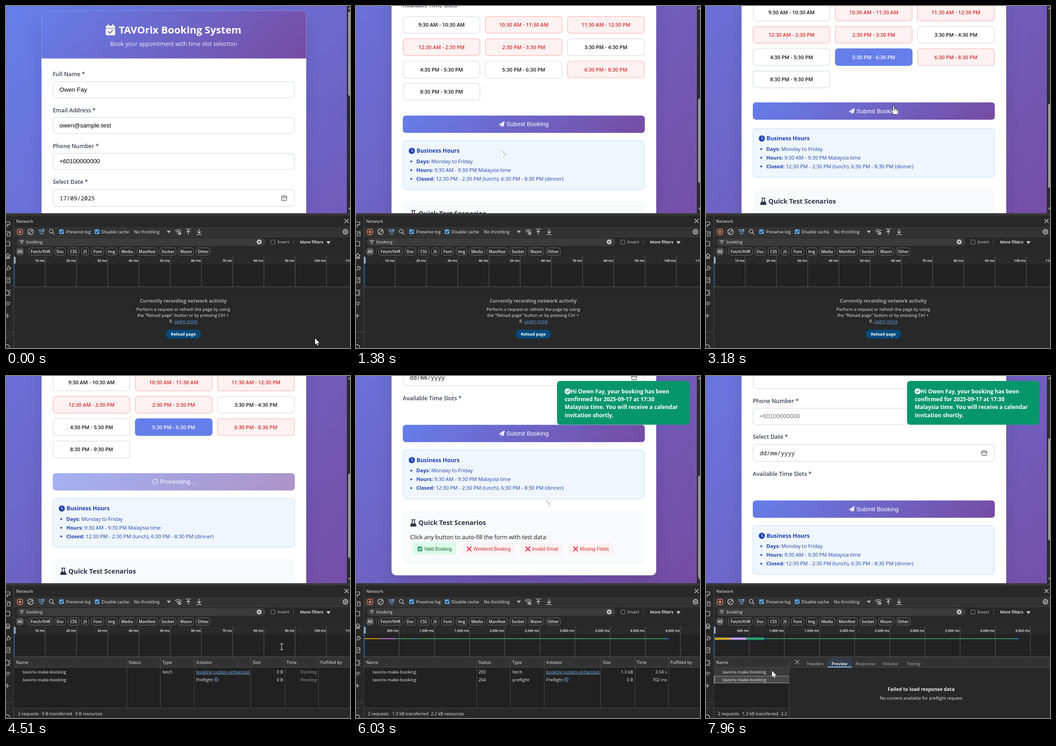
These frames come from a looping animation (750 px wide and 746 px high, 8 s). An HTML page:

```html
<!DOCTYPE html>
<html lang="en">
<head>
<meta charset="utf-8">
<title>Booking form</title>
<style>
html, body { margin: 0; width: 100%; height: 100%; overflow: hidden; background: #282828; }
svg { display: block; font-family: "Open Sans", "Noto Sans", sans-serif; }
.arial { font-family: "Liberation Sans", Arial, sans-serif; }
.mono { font-family: "Noto Sans Mono", monospace; }
.line { fill: none; stroke-linecap: round; stroke-linejoin: round; }
</style>
</head>
<body>
<svg id="stage" width="750" height="746" viewBox="0 0 750 746"></svg>
<script>
const LOOP = 8000, SLOTS_H = 183, VIEW_H = 452, PAGE_H = 868;
const PHONE = '+60100000000', ENDPOINT = 'tavorix-make-booking';

// ---- drawing helpers ----
const text = (x, y, s, size, fill, o = {}) =>
  `<text x="${x}" y="${y}" dy=".36em" font-size="${size}" fill="${fill}" font-weight="${o.w || 400}"` +
  ` text-anchor="${o.a || 'start'}" class="${o.c || ''}"${o.u ? ' text-decoration="underline"' : ''}>${s}</text>`;
const rect = (x, y, w, h, fill, r = 0, stroke = 'none', sw = 1) =>
  `<rect x="${x}" y="${y}" width="${w}" height="${h}" rx="${r}" fill="${fill}" stroke="${stroke}" stroke-width="${sw}"/>`;
const box = (x, y, w, h, fill, r, stroke, sw) =>
  rect(x + sw / 2, y + sw / 2, w - sw, h - sw, fill, r, stroke, sw);
const line = (d, stroke, sw = 1) => `<path class="line" d="${d}" stroke="${stroke}" stroke-width="${sw}"/>`;
const fill = (d, c) => `<path d="${d}" fill="${c}"/>`;
const dot = (x, y, r, c, stroke = 'none', sw = 1) =>
  `<circle cx="${x}" cy="${y}" r="${r}" fill="${c}" stroke="${stroke}" stroke-width="${sw}"/>`;
const group = (id, s, hidden) => `<g id="${id}"${hidden ? ' display="none"' : ''}>${s}</g>`;
const grad = (id, x, y, w, h) => {
  const cx = x + w / 2, cy = y + h / 2, k = (w + h) / 4;
  return `<linearGradient id="${id}" gradientUnits="userSpaceOnUse" x1="${cx - k}" y1="${cy - k}" x2="${cx + k}" y2="${cy + k}">` +
    '<stop stop-color="#667eea"/><stop offset="1" stop-color="#764ba2"/></linearGradient>';
};

// ---- web page ----
const label = (y, s) => text(102, y, s, 12.3, '#374151', { w: 600 });
const field = (y, h = 37) => box(102, y, 527.5, h, '#fff', 6.5, '#e1e5e9', 1.7);
const value = (y, s, c = '#000') => text(116.5, y, s, 13.2, c, { c: 'arial' });
const date = s => text(117, 419, s, 12.8, '#111', { c: 'mono' });

const header =
  rect(77.5, 10.8, 577, 115, 'url(#headFill)', 10) + rect(77.5, 114.5, 577, 20, '#fff') +
  rect(217.5, 43, 20.5, 21, '#fff', 2.5) + rect(221.5, 40, 2.8, 6, '#fff', 1) + rect(231.5, 40, 2.8, 6, '#fff', 1) +
  line('M217 48.6H239', '#6c68c8', 1.4) + line('M223.5 56L226.7 59.2L232.5 53', '#6c68c8', 2.2) +
  text(513, 52.5, 'TAVOrix Booking System', 22, '#fff', { w: 700, a: 'end' }) +
  text(365.5, 82.5, 'Book your appointment with time slot selection', 12.55, '#f2effb', { a: 'middle' });

const calendar = rect(601, 414, 11, 10.5, 'none', 2, '#333', 1) + line('M601 417H612', '#333', 1) +
  [0, 1, 2].map(i => dot(604 + i * 2.6, 419.6, .6, '#333') + dot(604 + i * 2.6, 422, .6, '#333')).join('');

const form =
  label(149, 'Full Name *') + field(164) + label(227.3, 'Email Address *') + field(242.2) +
  label(305.6, 'Phone Number *') + field(320.6) + label(384, 'Select Date *') + field(399, 39) + calendar +
  label(465, 'Available Time Slots *') +
  group('filled', value(182, 'Owen Fay') + value(260.3, 'owen@sample.test') + value(338.5, PHONE) + date('17/09/2025')) +
  group('blank', value(338.5, PHONE, '#757575') + date('dd/mm/yyyy'), true);

const slotNames = ['9:30 AM - 10:30 AM', '10:30 AM - 11:30 AM', '11:30 AM - 12:30 PM', '12:30 AM - 2:30 PM',
  '2:30 PM - 3:30 PM', '3:30 PM - 4:30 PM', '4:30 PM - 5:30 PM', '5:30 PM - 6:30 PM', '6:30 PM - 8:30 PM', '8:30 PM - 9:30 PM'];
const booked = [1, 2, 3, 4, 8], picked = 7;
const slot = (i, bg, edge, ink) => {
  const x = 102 + i % 3 * 179.2, y = 488.5 + Math.floor(i / 3) * 48.7;
  return box(x, y, 169, 38.2, bg, 6.5, edge, 1.7) +
    text(x + 84.5, y + 19.3, slotNames[i], 11.15, ink, { w: 600, a: 'middle' });
};
const slots = slotNames.map((_, i) => booked.includes(i)
  ? slot(i, '#fef1f1', '#fcc8c8', '#d32a2a') : slot(i, '#fff', '#e1e5e9', '#111')).join('') +
  group('slotHover', slot(picked, '#f3f5fe', '#667eea', '#111'), true) +
  group('slotPicked', slot(picked, '#667eea', '#667eea', '#fff'), true);

const spokes = Array.from({ length: 8 }, (_, i) => {
  const a = i * Math.PI / 4;
  return dot(5.3 * Math.cos(a), 5.3 * Math.sin(a), i === 5 ? .7 : 1.25, '#fff');
}).join('');
const submit = group('submit',
  rect(102, 522.5, 527.7, 37.7, 'url(#btnFill)', 6.7) +
  group('idle', fill('M311 542.5L324 534.5L322 546.5L318.3 545L316 548V544.2L321.5 537.5L314.6 543.8Z', '#fff') +
    text(327.7, 541, 'Submit Booking', 13.2, '#fff', { c: 'arial' })) +
  group('busy', `<g id="spin">${spokes}</g>` + text(336, 541, 'Processing...', 13.2, '#fff', { c: 'arial' }), true));

const BLUE = '#1e40af';
const hours = box(102, 577, 527.7, 107.3, '#eff6ff', 6.7, '#bfdbfe', 1) +
  dot(121.7, 599.5, 6.7, BLUE) + line('M121.7 595.5V599.7L124.4 601.5', '#eff6ff', 1.3) +
  text(132, 599.5, 'Business Hours', 12.3, BLUE, { w: 700 }) +
  [['Days', 'Monday to Friday'], ['Hours', '9:30 AM - 9:30 PM Malaysia time'],
   ['Closed', '12:30 PM - 2:30 PM (lunch), 6:30 PM - 8:30 PM (dinner)']].map(([k, v], i) =>
    dot(120.5, 622.5 + i * 19, 2, BLUE) +
    text(131.5, 622.5 + i * 19, `<tspan font-weight="700">${k}:</tspan> ${v}`, 11.1, BLUE)).join('');

const chip = (x, w, s, ok) => rect(x, 779.7, w, 26, ok ? '#dcfce7' : '#fef2f2', 5) +
  (ok ? rect(x + 11, 788, 10.5, 10.5, '#3a9d78', 1.5) + line(`M${x + 13.5} 793.3l2 2.2l3.6-4.3`, '#fff', 1.4)
      : line(`M${x + 12} 788.8l8.6 8.6m0-8.6l-8.6 8.6`, '#e63462', 2.2)) +
  text(x + 25.5, 793, s, 10, ok ? '#166534' : '#d02c2c', { c: 'arial' });
const quick = rect(102, 709, 527.7, 118, '#f8fafc', 8) +
  line('M121 729.5h8m-6.3.5v5l-3.6 7q-.5 1.3 .8 1.3h10.2q1.3 0 .8-1.3l-3.6-7v-5', '#2b3347', 1.7) +
  fill('M121.5 737.5h7l3 6h-13z', '#2b3347') +
  text(136, 736.3, 'Quick Test Scenarios', 14.4, '#2b3347', { w: 700 }) +
  text(118.3, 767.5, 'Click any button to auto-fill the form with test data:', 12.6, '#111') +
  chip(123, 95.5, 'Valid Booking', true) + chip(230.5, 116, 'Weekend Booking') +
  chip(358.5, 92, 'Invalid Email') + chip(462.5, 99, 'Missing Fields');

const toast = rect(438.3, 10.8, 289, 95.4, '#059669', 6.7) + dot(461.5, 33.3, 6.6, '#fff') +
  line('M458.5 33.5L460.7 35.7L464.6 31.3', '#059669', 1.6) +
  text(468.3, 33.5, 'Hi Owen Fay, your booking has been', 11.9, '#fff', { w: 700 }) +
  ['confirmed for 2025-09-17 at 17:30', 'Malaysia time. You will receive a calendar', 'invitation shortly.']
    .map((s, i) => text(455, 50.8 + i * 17.3, s, 11.9, '#fff', { w: 700 })).join('');

// ---- network panel ----
const INK = '#ececec', EDGE = '#4a4a4a', LINK = '#7cb8f7';
const small = (x, y, s, c = INK, o) => text(x, y, s, 9.4, c, o);
const check = x => rect(x, 487.3, 10, 10, '#5ea9ee', 1.5) + line(`M${x + 2.3} 492.5l2 2.2l3.7-4.6`, '#1c1c1c', 1.5);
const pills = [['All', 22, 39], ['Fetch/XHR', 49, 102], ['Doc', 106, 130.5], ['CSS', 135, 160], ['JS', 164, 181.5], ['Font', 186, 213.5],
  ['Img', 218, 242.5], ['Media', 247, 281], ['Manifest', 285, 330.5], ['Socket', 335, 371], ['Wasm', 375.5, 409.5], ['Other', 414, 446]]
  .map(([s, a, b], i) => box(a, 527, b - a, 17, i ? '#282828' : '#4c4c4c', 5, i ? '#757575' : '#4c4c4c', 1) +
    text((a + b) / 2, 535.8, s, 8.6, INK, { w: 600, a: 'middle' })).join('');

const sidebar = rect(0, 457, 17, 289, '#282828') + line('M0 712H17', EDGE) +
  [`M0 471H8V477M3 479l5-3m-5 0v6`, `M0 492H9V497M3 495H9V502H3Z`, `M-2 513.5H8V523.5H-2`, `M-1 545L4 540L9 545M1 544V551H3.2V547H5.5V551H7.5V544`,
   `M0 568l-3 4l3 4M5 567l-3 10M6 568l4 4l-4 4`, `M0 592.5H8.5V603.5H0M0 596H8M0 600H5`, `M0 620q6-1 7 5q-1 7-7 6M6 622l3-2m-2 6h3m-4 4l3 2`,
   `M-1 648q5-4 10 0M1 651q3-2.4 6 0M3.3 654h1`, `M-1 675.5H7M3 671V680`, `M2 723.5h.2M6 723.5h.2`, `M0 739q8-1 8 6`]
  .map(d => line(d, '#cfcfcf', 1.2)).join('') + line('M17 457V746', EDGE);

const toolbar =
  rect(0, 452, 750, 294, '#282828') + rect(0, 452, 750, 5, '#383838') +
  rect(17, 482, 733, 21, '#333') + rect(17, 503, 733, 1, '#3f3f3f') + sidebar +
  small(22, 469.5, 'Network') + line('M738.5 465l8 8m0-8l-8 8', INK, 1.1) +
  rect(24.5, 487, 12, 11.5, 'none', 3.5, '#ee8a6a', 1.3) + rect(28, 490.2, 5, 5, '#ee8a6a', 1) +
  dot(53.5, 492.5, 6, 'none', INK, 1.1) + line('M49.5 496.7L57.7 488.4', INK, 1.1) +
  line('M71 488.5H79M72.5 492.5H83M75 496.7H80.5', LINK, 1.4) + dot(81.5, 488.5, 2, LINK) +
  dot(98.5, 491.3, 4, 'none', INK, 1.1) + line('M101.5 494.3L105 497.8', INK, 1.2) +
  check(116) + small(131, 492.5, 'Preserve log') + check(193.7) + small(208.3, 492.5, 'Disable cache') +
  small(279, 492.5, 'No throttling') + fill('M350.5 490H359.5L355 495.5Z', '#b5b5b5') +
  line('M369 490q6.5-5 13 0M371.5 493q4-3 7-1M374 495.8l1 1', INK, 1.2) + dot(378.8, 495.8, 2.4, 'none', INK, 1.4) +
  line('M392.5 486.5H402.5M397.5 498V489.5M394 493l3.5-3.5l3.5 3.5', INK, 1.1) +
  line('M416 498.5H426M421 486.5V495.5M417.5 492l3.5 3.5l3.5-3.5', INK, 1.1) +
  dot(740, 492.5, 5, 'none', INK, 1.4) + dot(740, 492.5, 1.8, 'none', INK, 1.1) +
  rect(23.5, 506, 542.5, 17.5, '#3b3b3b', 8.7) + line('M30 511.5H39M31.5 514.5H37.5M33 517.5H36', INK, 1.1) +
  small(44.5, 515, 'booking') + dot(552, 514.5, 5.3, '#d0d0d0') + line('M550.2 512.7l3.6 3.6m0-3.6l-3.6 3.6', '#333', 1.2) +
  rect(577.5, 510.5, 9, 9, 'none', 1.5, '#8a8a8a', 1) + small(592, 515, 'Invert', '#d0d0d0') + line('M626.5 508V521', '#555') +
  text(641, 515, 'More filters', 9.1, '#fff', { w: 600 }) + fill('M698.5 513H707.5L703 519.5Z', '#c8c8c8') +
  pills + line('M44.5 529V542', '#555');

const ruler = (step, gap, n, bars) => rect(17.5, 546, 733, 66.5, '#222') + rect(17.5, 546, 733, 17, '#2a2a2a') +
  Array.from({ length: n }, (_, i) => {
    const x = 17.5 + gap * (i + 1);
    return line(`M${x} 546V612`, '#5a5a5a') +
      text(x - 1.5, 555.3, (step * (i + 1)).toLocaleString('en-US') + ' ms', 7.4, '#fff', { a: 'end', w: 600 });
  }).join('') + bars + rect(17.5, 546, 1.5, 66.5, '#1f6fb5') + rect(17, 547, 4, 15, '#8fa9c4', 1.5) + line('M17 612.5H750', '#5a5a5a');
const bars = (pts, h = 2) => pts.map(([a, b, c]) => rect(a, 573 - h / 2, b - a, h, c)).join('');
const GOLD = '#d99a12', VIOLET = '#b876d8', GREEN = '#2c9a50', SKY = '#2f7fdb';

const recording =
  text(386.5, 643.5, 'Currently recording network activity', 10.4, '#a6a6a6', { w: 700, a: 'middle' }) +
  small(386.5, 662, 'Perform a request or refresh the page by using', INK, { a: 'middle' }) +
  small(386, 675, 'the "Reload page" button or by pressing Ctrl +', INK, { a: 'middle' }) +
  small(356, 688, 'R.') + small(367, 688, 'Learn more', '#5ea9ee', { u: 1 }) +
  rect(348, 706, 77, 19.5, '#004a7c', 9.7) + text(386.5, 716, 'Reload page', 9, '#fff', { w: 700, a: 'middle' });

const rows = [645.5, 663];
const cols = [[22, 'Name'], [267, 'Status'], [341, 'Type'], [415, 'Initiator'], [538, 'Size'], [612, 'Time'], [685.5, 'Fulfilled by']];
const right = (x, y, s, c) => small(x, y, s, c, { a: 'end' });
const table = rect(17.5, 613, 733, 112, '#212121') + rect(17.5, 613, 733, 22, '#333') +
  `<rect id="rowHover" x="17.5" y="654" width="733" height="17" fill="#3a3a3a"/>` +
  cols.map(([x, s]) => small(x, 625, s)).join('') +
  [263.5, 336.5, 410.5, 533.5, 608.5, 681.5].map(x => line(`M${x} 613V724`, EDGE)).join('') +
  line('M17 635.5H750M17 724.5H750', EDGE) + rows.map(y => small(36, y, ENDPOINT)).join('') + small(341, rows[0], 'fetch') +
  small(414.5, rows[0], 'booking-system-enhanced.', LINK, { u: 1 }) + small(414.5, rows[1], 'Preflight') +
  dot(458.5, 662.3, 4.5, 'none', LINK, .9) + line('M457 664.5v-4.5l-1 1.2M460 660v4.5l1-1.2', LINK, .8) +
  right(604, rows[1], '0 B') + small(26, 737, '2 requests') +
  group('wait1', right(604, rows[0], '0 B') + right(678, rows[0], 'Pending', '#9a9a9a') +
    small(78.5, 737, '0 B transferred') + small(151, 737, '0 B resources')) +
  group('wait2', right(678, rows[1], 'Pending', '#9a9a9a')) +
  group('done1', small(267, rows[0], '200') + right(604, rows[0], '1.3 kB') + right(678, rows[0], '3.58 s') +
    small(79, 737, '1.3 kB transferred') + small(163.5, 737, '2.2 kB resources')) +
  group('done2', small(267, rows[1], '204') + small(341, rows[1], 'preflight') + right(678, rows[1], '702 ms'));

const detail = rect(177, 613, 573, 133, '#282828') + rect(182, 613, 568, 22.5, '#333') +
  rect(177, 613, 5, 22.5, '#333') + rect(17.5, 636, 164, 89, '#212121') + line('M17 724.5H181', EDGE) +
  group('nameHover', rect(17.5, 636, 164, 17.5, '#3a3a3a'), true) +
  rect(17.5, 654, 164, 16.5, '#484848') + line('M18 654.5H181M18 669.5H181', '#9a9a9a') + rect(17.5, 654, 2, 16.5, '#9a9a9a') +
  rows.map(y => small(36, y, ENDPOINT)).join('') + line('M181.5 613V746M17 635.5H750', EDGE) +
  line('M194 619.5l9 9m0-9l-9 9', INK, 1) + rect(265, 614.5, 52.5, 21, '#333d49') + rect(265, 633.8, 52.5, 2, '#8ec5f8') +
  [[220, 'Headers'], [326, 'Response'], [385, 'Initiator'], [437.5, 'Timing']].map(([x, s]) => small(x, 627.5, s, '#b4b4b4')).join('') +
  text(291, 627.5, 'Preview', 9.2, '#fff', { w: 600, a: 'middle' }) +
  text(469, 683.7, 'Failed to load response data', 10.4, INK, { w: 700, a: 'middle' }) +
  small(469, 702.5, 'No content available for preflight request', INK, { a: 'middle' });

// ---- pointers ----
const pointers =
  group('arrow', fill('M0 0V13.5L3 10.8L5.2 15.3L7.2 14.4L5.2 10H9.7Z', '#fff') + line('M.5 .5L10 10', '#444', .8) +
    line('M5.3 10.5L7 14M5 15l.6.4', '#777', .6)) +
  group('hand', `<path d="M-1.5 1.5Q-1.5 0 0 0T1.5 1.5V6.5L3 6.3Q4 6 4.5 7Q6 6.5 6.7 7.8Q8.5 7.5 8.5 9.5V14Q8.5 16 7.5 19H-.5Q-1 16-4.5 12Q-5 10-3.3 10L-1.5 11.8Z" fill="#fff" stroke="#222" stroke-width=".9"/>` +
    line('M1.6 7v4M4.4 7.5v3.5M6.7 8.2v3', '#222', .7)) +
  group('ibeam', line('M-3 -6H-1L0 -5L1 -6H3M0 -5V6M-3 7H-1L0 6L1 7H3', '#f0f0f0', 1.1));

document.getElementById('stage').innerHTML =
  '<defs>' + grad('bgTall', 0, 0, 743.5, PAGE_H + SLOTS_H) + grad('bgShort', 0, 0, 743.5, PAGE_H) +
  grad('headFill', 77.5, 10.8, 577, 103.5) + grad('btnFill', 102, 522.5, 527.7, 37.7) +
  `<clipPath id="view">${rect(0, 0, 743.5, VIEW_H, '#000')}</clipPath>` +
  '<filter id="blur" x="-20%" y="-20%" width="140%" height="140%"><feGaussianBlur stdDeviation="16"/></filter></defs>' +
  '<g clip-path="url(#view)">' + group('page',
    `<rect id="bg" width="743.5"/><rect id="shade" x="77.5" y="27.5" width="577" rx="10" opacity=".1" filter="url(#blur)"/>` +
    '<rect id="card" x="77.5" y="10.8" width="577" rx="10" fill="#fff"/>' +
    header + form + group('slots', slots) + group('lower', submit + hours + quick)) + group('toast', toast, true) + '</g>' +
  rect(743.5, 0, 6.5, VIEW_H, '#2c2c2c') + '<rect id="thumb" x="746" width="9" rx="4" fill="#9c9c9c"/>' +
  fill('M746 7L749.5 2.5L753 7ZM746 440L749.5 445L753 440Z', '#9c9c9c') +
  toolbar + group('ruler0', ruler(10, 68.1, 11, '')) +
  group('ruler1', ruler(100, 93.8, 8, bars([[18, 228, GOLD], [228, 440, VIOLET], [440, 676, GREEN]])), true) +
  group('ruler2', ruler(500, 76.65, 10, bars([[18, 53, GOLD], [53, 88, VIOLET], [88, 125, GREEN], [125, 133, SKY],
    [133, 674, GREEN], [674, 682, SKY]])), true) +
  group('barPick', rect(18, 569, 110, 7.5, '#173f66') + bars([[19, 53, '#e0a81e'], [53, 88, '#cfa0e4'], [88, 126.5, '#2fa75c']], 4.5), true) +
  group('recording', recording) + group('table', table, true) + group('detail', detail, true) + group('cursor', pointers);

// ---- timeline ----
const el = {};
document.querySelectorAll('[id]').forEach(n => el[n.id] = n);
const show = (id, on) => el[id].setAttribute('display', on ? 'inline' : 'none');
const move = (id, x, y) => el[id].setAttribute('transform', `translate(${x} ${y})`);
const ease = p => p * p * (3 - 2 * p);
function at(keys, t) {
  const i = keys.findIndex(k => k[0] > t);
  if (i < 0) return keys[keys.length - 1].slice(1);
  if (!i) return keys[0].slice(1);
  const a = keys[i - 1], b = keys[i], p = ease((t - a[0]) / (b[0] - a[0]));
  return a.slice(1).map((v, j) => v + (b[j + 1] - v) * p);
}
const SCROLL = [[0, 0], [300, 0], [850, 290], [920, 290], [1380, 466.5], [1850, 466.5], [2300, 493.5],
  [5639, 493.5], [5640, 416], [6230, 416], [6560, 180], [6960, 180], [7300, 251]];
const POINTER = [[0, 674, 725], [70, 674, 725], [450, 317, 315], [1850, 317, 315], [2450, 366, 112], [2710, 366, 112],
  [3180, 409, 217.5], [3920, 409, 217.5], [4500, 601, 590], [5600, 601, 590], [6030, 414, 271], [6230, 414, 271],
  [6560, 530, 260], [6960, 530, 260], [7500, 144, 660], [7880, 144, 660], [7960, 144, 643]];
const SLIDE = [[5640, 310], [5900, 0]];
const PICK = 2710, SEND = 3920, LISTED = 4050, PREFLIGHT = 4850, DONE = 5580, RESET = 5640, OPEN = 7700;

function draw(t) {
  const [scroll] = at(SCROLL, t), [x, y] = at(POINTER, t), reset = t >= RESET, extra = reset ? 0 : SLOTS_H;
  const height = PAGE_H + extra, busy = t >= SEND && !reset;
  move('page', 0, -scroll);
  move('lower', 0, extra);
  el.bg.setAttribute('height', height);
  el.bg.setAttribute('fill', reset ? 'url(#bgShort)' : 'url(#bgTall)');
  for (const id of ['card', 'shade']) el[id].setAttribute('height', height - 28);
  el.thumb.setAttribute('y', 12 + scroll / height * 428);
  el.thumb.setAttribute('height', VIEW_H / height * 428);

  show('filled', !reset);
  show('blank', reset);
  show('slots', !reset);
  show('slotHover', t >= 2350 && t < PICK);
  show('slotPicked', t >= PICK);
  move('submit', 0, t >= 3050 && t < SEND ? -1.7 : 0);
  el.submit.setAttribute('opacity', busy ? .6 : 1);
  show('idle', !busy);
  show('busy', busy);
  el.spin.setAttribute('transform', `translate(325.3 541) rotate(${t * .36 % 360})`);
  show('toast', reset);
  move('toast', at(SLIDE, t)[0], 0);

  show('recording', t < LISTED);
  show('table', t >= LISTED);
  show('wait1', t < DONE);
  show('done1', t >= DONE);
  show('wait2', t < PREFLIGHT);
  show('done2', t >= PREFLIGHT);
  show('ruler0', t < PREFLIGHT);
  show('ruler1', t >= PREFLIGHT && t < DONE);
  show('ruler2', t >= DONE);
  show('rowHover', t >= 7480 && t < OPEN);
  show('barPick', t >= OPEN);
  show('detail', t >= OPEN);
  show('nameHover', y < 654);

  const kind = t >= 2350 && t < SEND ? 'hand' : t > 4000 && t < 6000 && y > 563 && y < 612 ? 'ibeam' : 'arrow';
  for (const id of ['arrow', 'hand', 'ibeam']) show(id, id === kind);
  move('cursor', x, y);
}
const start = performance.now();
function tick() {
  draw((performance.now() - start) % LOOP);
  requestAnimationFrame(tick);
}
tick();
</script>
</body>
</html>
```
